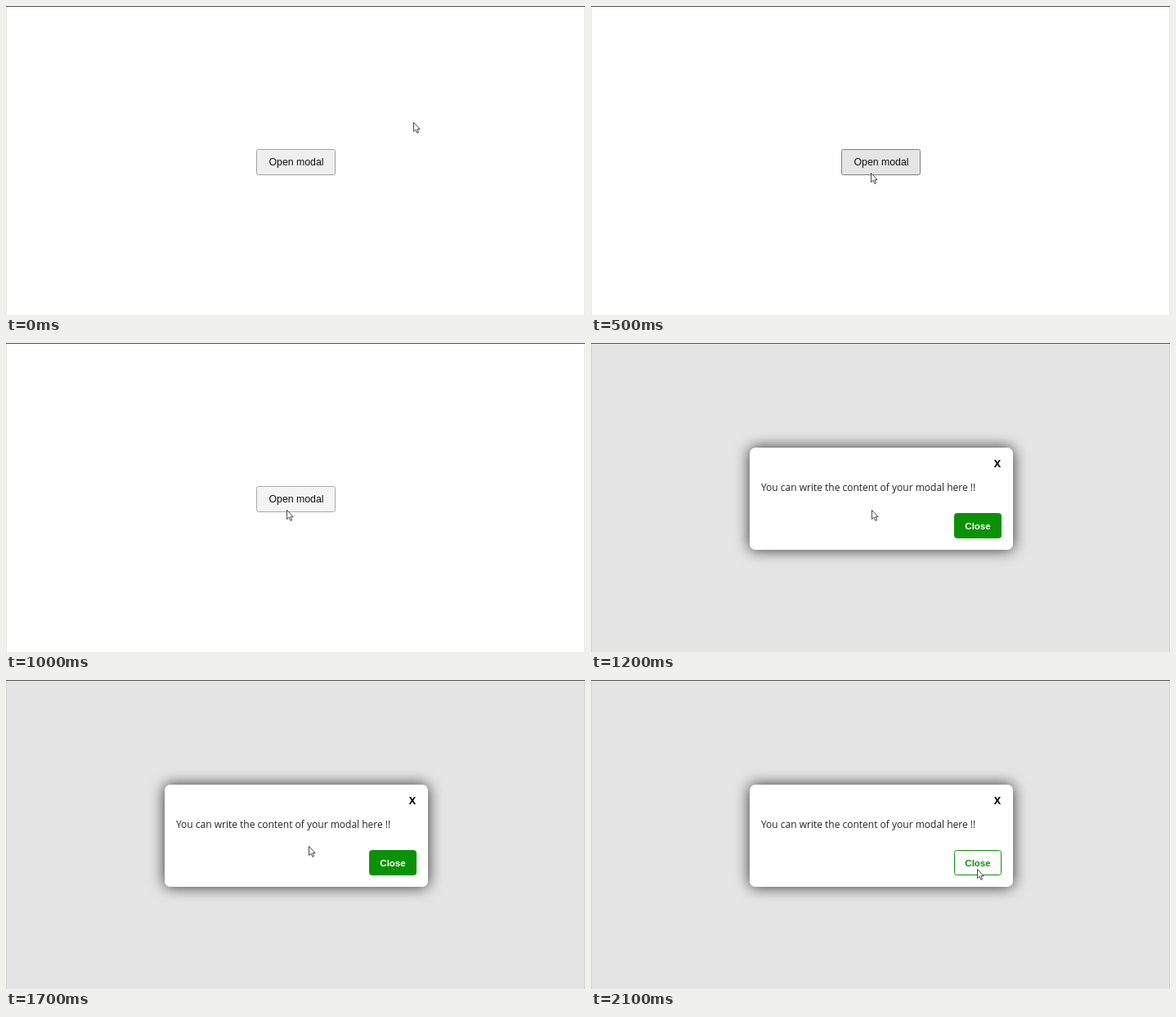
Write an HTML page that moves like this. It is 708 px wide and 378 px high and loops after 2.9 s.

```html
<!DOCTYPE html>
<html lang="en">
<head>
<meta charset="utf-8">
<title>Modal demo</title>
<style>
html, body { margin: 0; width: 100%; height: 100%; overflow: hidden; background: #fefefe; }
svg { display: block; }
.ui { font-family: "Liberation Sans", Arial, sans-serif; }
.copy { font-family: "Open Sans", "Noto Sans", sans-serif; }
#panel { filter: drop-shadow(0 0 9px rgba(0, 0, 0, .8)); }
</style>
</head>
<body>
<svg width="708" height="378" viewBox="0 0 708 378">
  <rect id="page" width="708" height="378"/>
  <path d="M.5 0V378M707.5 0V378" stroke="#000" stroke-opacity=".08"/>
  <path d="M0 .5H708" stroke="#555"/>

  <g id="opener" class="ui">
    <rect id="openBox" x="306.5" y="175.5" width="96" height="31" rx="2"/>
    <text x="355" y="195" font-size="12.3" text-anchor="middle" fill="#111">Open modal</text>
  </g>

  <g id="modal">
    <rect id="panel" x="194" y="128" width="322" height="125" rx="7" fill="#fff"/>
    <text class="copy" x="497" y="152" font-size="12.5" font-weight="700" text-anchor="middle">X</text>
    <text class="copy" x="208" y="180.5" font-size="12" fill="#222">You can write the content of your modal here !!</text>
    <rect id="closeBox" x="444.5" y="208.5" width="57" height="30" rx="3" stroke="#0a9205"/>
    <text id="closeText" class="ui" x="473" y="227.5" font-size="11.5" font-weight="700" text-anchor="middle">Close</text>
  </g>

  <path id="cursor" d="M.5 .5V11.6L3.1 9.3 4.9 13.4 6.6 12.6 4.9 8.7H8.2Z" fill="#fff" stroke="#333" stroke-width=".9"/>
</svg>
<script>
const LOOP = 2900;
const $ = id => document.getElementById(id);

// Every track is a list of [start time, ...values], held until the next entry.
const pointer = [
  [0, 498, 142], [200, 478, 146], [300, 394, 176], [400, 355, 198], [500, 342, 204], [700, 343, 204],
  [1700, 370, 203], [1800, 396, 206], [1900, 432, 216], [2000, 461, 227], [2100, 472, 231]
];
const openStyle = [
  [0, "#efefef", "#a2a2a2"], [300, "#efefef", "#8f8f96"],
  [400, "#e5e5e5", "#808080"], [1000, "#f4f4f4", "#aaaaaa"]
];

const at = (track, t) => track.findLast(step => step[0] <= t).slice(1);
const show = (id, on) => $(id).setAttribute("visibility", on ? "visible" : "hidden");
const paint = (id, fill) => $(id).setAttribute("fill", fill);

function draw(now) {
  const t = now % LOOP;
  const opened = t >= 1200;
  const closeHover = t >= 2000;
  const [fill, stroke] = at(openStyle, t);

  paint("page", opened ? "#e5e5e5" : "#fefefe");
  show("opener", !opened);
  show("modal", opened);
  paint("openBox", fill);
  $("openBox").setAttribute("stroke", stroke);
  paint("closeBox", closeHover ? "#fff" : "#0a9205");
  paint("closeText", closeHover ? "#0a9205" : "#fff");
  $("cursor").setAttribute("transform", `translate(${at(pointer, t)})`);
}

const start = performance.now();
function tick() {
  draw(performance.now() - start);
  requestAnimationFrame(tick);
}
tick();
</script>
</body>
</html>
```
